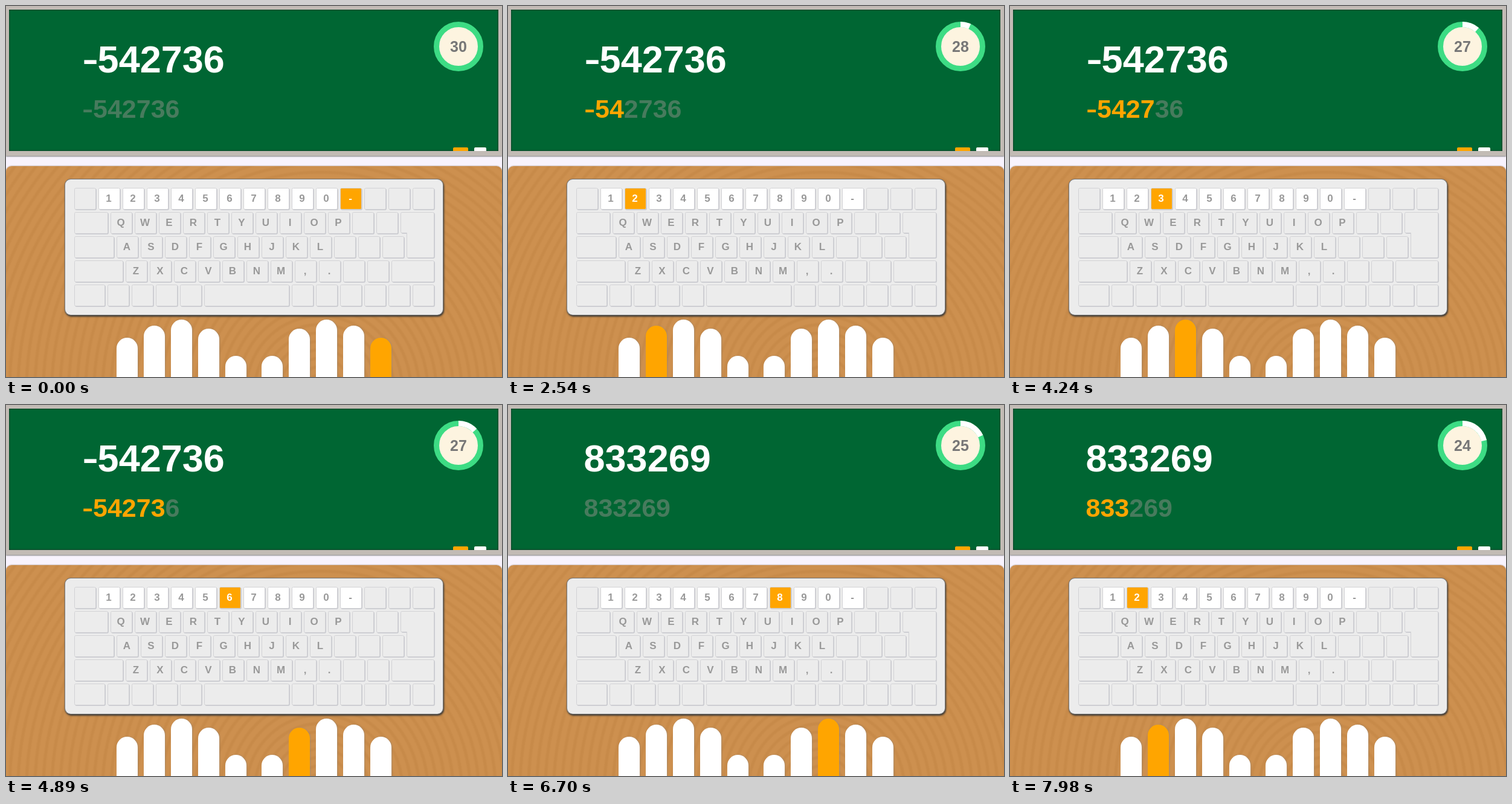
These frames come from a looping animation (821 by 614 pixels, 8 s). An HTML page:

```html
<!DOCTYPE html>
<html lang="en">
<head>
<meta charset="utf-8">
<title>Typing practice</title>
<style>
html, body { margin: 0; width: 100%; height: 100%; overflow: hidden; background: #f8f3fd; }
#stage { position: absolute; left: 0; top: 0; width: 821px; height: 614px; overflow: hidden; }
#board { position: absolute; inset: 0 0 auto; height: 248px; background: #c2bbb5; box-shadow: 0 1px 2px #777; }
#green { position: absolute; left: 5px; top: 6px; width: 810px; height: 234px; background: #063; box-shadow: inset 0 0 3px #222; }
#desk {
  position: absolute; left: 0; top: 265px; width: 821px; height: 349px;
  border-radius: 9px 9px 0 0; box-shadow: 0 0 2px #765;
  background: repeating-radial-gradient(circle at 520px 370px, #cd904f 0 6px, #c78a49 9px 11px, #cd904f 14px);
}
#keyboard {
  position: absolute; left: 98px; top: 287px; width: 625px; height: 224px;
  border-radius: 9px; background: #ececec; box-shadow: 0 0 0 1px #777, 1px 2px 3px 1px #333;
}
svg { position: absolute; left: 0; top: 0; }
text { font-family: "Liberation Sans", Arial, sans-serif; font-weight: 700; font-kerning: none; }
.key rect, .enter { fill: #ececec; stroke: #d2d2d5; }
.key, .enter { filter: drop-shadow(1px 1px 0 #c9cad0); }
.key text { font-size: 17px; fill: #999; text-anchor: middle; }
.key.used rect { fill: #fff; }
.key.on rect { fill: orange; }
.key.on text { fill: #fff; }
.finger { fill: #fff; filter: drop-shadow(1px 0 1px #8887); }
.finger.on { fill: orange; }
#word { fill: #fff; }
#copy { fill: #477b5d; }
#copy .done { fill: orange; }
.dash { font-weight: 400; }
#count { font-size: 25px; fill: #777; text-anchor: middle; }
</style>
</head>
<body>
<div id="stage">
  <div id="board"><div id="green"></div></div>
  <div id="desk"></div>
  <div id="keyboard"></div>
  <svg width="821" height="614">
    <path d="M740 240v-4q0-2 2-2h21q2 0 2 2v4z" fill="orange"/>
    <path d="M775 240v-4q0-2 2-2h16q2 0 2 2v4z" fill="#fff"/>
    <g id="word"></g>
    <g id="copy"></g>
    <circle cx="749" cy="67" r="34" fill="#fdf4e0"/>
    <circle cx="749" cy="67" r="36.5" fill="none" stroke="#3ddc84" stroke-width="9"/>
    <circle id="spent" cx="749" cy="67" r="36.5" pathLength="360" fill="none" stroke="#fff" stroke-width="9" transform="rotate(-90 749 67)"/>
    <text id="count" x="749" y="76">30</text>
    <g id="keys"></g>
    <path class="enter" d="M655.5 341.5h51q2 0 2 2v71q0 2-2 2h-41q-2 0-2-2v-39h-8q-2 0-2-2v-30q0-2 2-2z"/>
    <g id="fingers"></g>
  </svg>
</div>
<script>
const LOOP = 8000, SECONDS_RATE = 0.808;
const $ = id => document.getElementById(id);

// Each row: first key width, labels ("_" is a blank key), optional width of a closing key.
const rows = [
  [35, "1234567890-___"],
  [55, "QWERTYUIOP__"],
  [65, "ASDFGHJKL___"],
  [80, "ZXCVBNM,.__", 70],
  [50, "____", 140, "______"]
];
const keys = {};
let markup = "";

function addKey(x, y, width, label = "_") {
  const used = /[0-9-]/.test(label) ? " used" : "";
  const text = label === "_" ? "" : `<text x="${x + 17}" y="${y + 23}">${label}</text>`;
  markup += `<g class="key${used}" data-label="${label}">` +
    `<rect x="${x + .5}" y="${y + .5}" width="${width}" height="35" rx="2"/>${text}</g>`;
}

rows.forEach(([first, ...parts], row) => {
  const y = 301 + row * 40;
  let x = 113;
  const place = (width, label) => { addKey(x, y, width, label); x += width + 5; };
  place(first);
  for (const part of parts) {
    if (typeof part === "number") place(part);
    else for (const label of part) place(35, label);
  }
});
$("keys").innerHTML = markup;
document.querySelectorAll(".key").forEach(key => keys[key.dataset.label] = key);

const tops = [549, 529, 519, 534, 579];
$("fingers").innerHTML = [...tops, ...tops.slice().reverse()].map((top, i) =>
  `<rect class="finger" x="${183 + 45 * i + (i > 4 ? 15 : 0)}" y="${top}" width="35" height="120" rx="17.5"/>`
).join("");
const fingers = [...$("fingers").children];
const fingerFor = { "-": 9, 2: 1, 3: 2, 4: 3, 5: 3, 6: 6, 7: 6, 8: 7, 9: 8 };

const words = [
  { text: "-542736", start: 0, presses: [1540, 1900, 2270, 2930, 3860, 4500, 5300] },
  { text: "833269", start: 5300, presses: [7020, 7460, 7780] }
];

function line(word, done, size, y, digitsX) {
  const mark = i => i < done ? "done" : "";
  const negative = word[0] === "-";
  const dash = negative
    ? `<text class="dash ${mark(0)}" x="125.8" y="${y + size * .085}" font-size="${size * 1.32}">-</text>` : "";
  const digits = [...word].map((c, i) => c === "-" ? "" : `<tspan class="${mark(i)}">${c}</tspan>`).join("");
  return `${dash}<text x="${negative ? digitsX : 125.5}" y="${y}" font-size="${size}">${digits}</text>`;
}

let shown = "";
function draw(now) {
  const t = now % LOOP;
  const elapsed = t / 1000 * SECONDS_RATE;
  $("spent").setAttribute("stroke-dasharray", `${elapsed * 12} 360`);
  $("count").textContent = 30 - Math.floor(elapsed);

  const word = words.findLast(w => t >= w.start);
  const done = word.presses.filter(p => t >= p).length;
  const state = word.text + done;
  if (state !== shown) {
    shown = state;
    const next = word.text[done];
    $("word").innerHTML = line(word.text, 0, 63, 109.5, 151.6);
    $("copy").innerHTML = line(word.text, done, 43, 185, 144);
    for (const label in keys) keys[label].classList.toggle("on", label === next);
    fingers.forEach((finger, i) => finger.classList.toggle("on", i === fingerFor[next]));
  }
  requestAnimationFrame(draw);
}
const begin = performance.now();
const tick = () => draw(performance.now() - begin);
tick();
</script>
</body>
</html>
```
